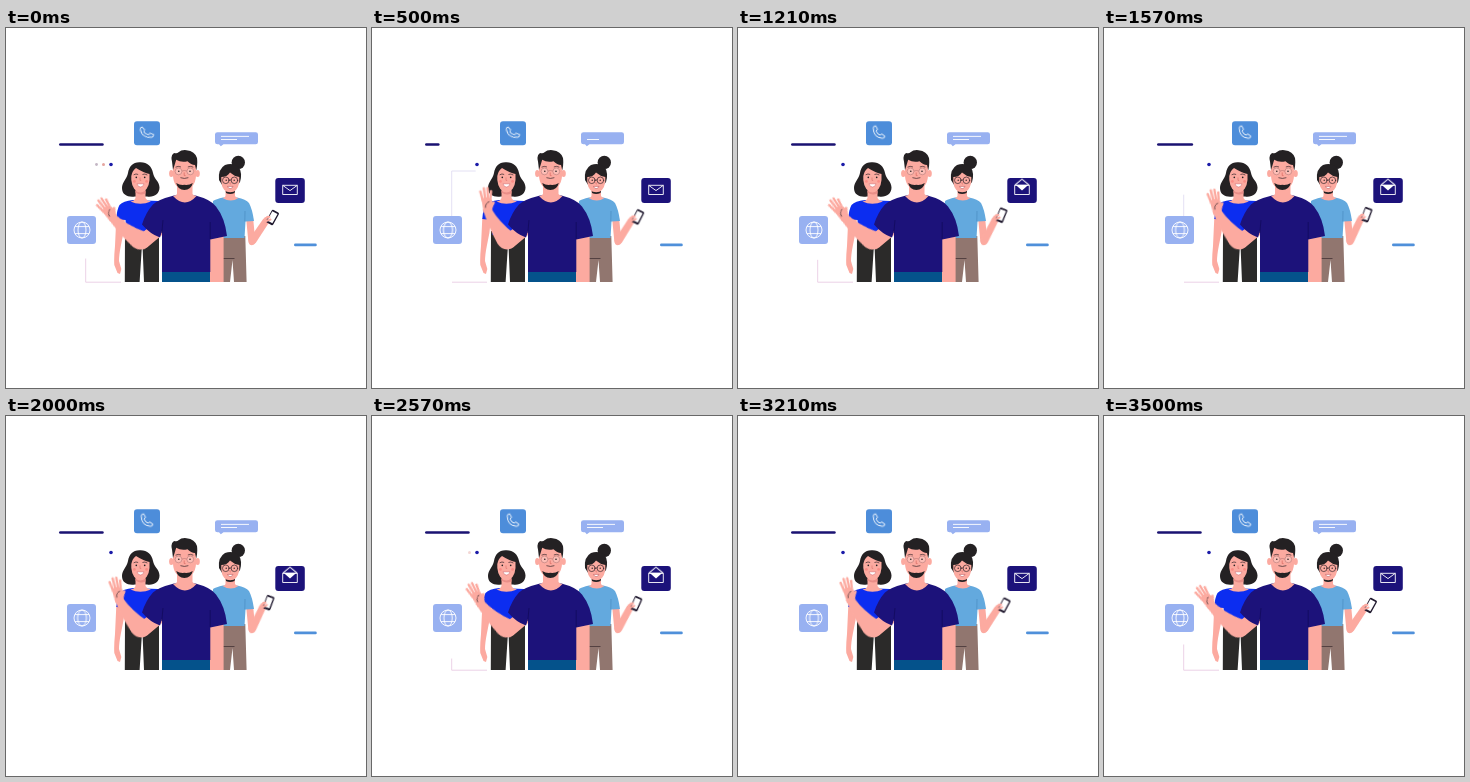
An HTML page that plays this animation: 360x360 px, repeating every 3.57 s.

```html
<!DOCTYPE html>
<html lang="en">
<head>
<meta charset="utf-8">
<title>Support team</title>
<style>
html, body { margin: 0; width: 100%; height: 100%; overflow: hidden; background: #fff; }
svg { display: block; width: 100vw; height: 100vh; }
.skin { fill: #fcaaa0; }
.limb { fill: none; stroke: #fcaaa0; stroke-linecap: round; stroke-linejoin: round; }
.ink { fill: #242123; }
.thin { fill: none; stroke: #33242a; stroke-width: .7; stroke-linecap: round; }
.icon { fill: none; stroke: #fff; stroke-width: .9; stroke-linejoin: round; }
.loop { animation: 3570ms linear infinite; }
.beat { animation: 1190ms linear infinite; }
.sway { animation: 595ms cubic-bezier(.37, 0, .63, 1) infinite alternate; }

.forearm { transform-origin: 135px 214px; animation-name: forearm; }
.hand { transform-origin: 116px 182px; animation-name: hand; }
@keyframes forearm { from { transform: rotate(-19deg); } to { transform: none; } }
@keyframes hand { from { transform: rotate(-13deg); } to { transform: none; } }

.hold { transform-origin: 246px 214px; animation: hold 1785ms cubic-bezier(.37, 0, .63, 1) infinite alternate; }
@keyframes hold { to { transform: rotate(-9deg); } }

.bar { stroke-dasharray: 42 60; animation-name: bar; }
@keyframes bar {
  0%, 28% { stroke-dashoffset: 0; }
  42% { stroke-dashoffset: 30; }
  46% { stroke-dashoffset: 36; }
  50% { stroke-dashoffset: 42.5; }
  66%, 100% { stroke-dashoffset: 0; }
}

.corner { stroke-dasharray: 61 80; animation-name: corner; }
@keyframes corner {
  0% { stroke-dashoffset: 2; }
  16% { stroke-dashoffset: 14; }
  30%, 54% { stroke-dashoffset: 26; }
  62%, 74% { stroke-dashoffset: 61; }
  94%, 100% { stroke-dashoffset: 0; }
}

.edge { stroke-dasharray: 69 140; animation-name: edge; }
@keyframes edge {
  0%, 28% { stroke-dashoffset: 69; }
  41%, 47% { stroke-dashoffset: 0; }
  56%, 100% { stroke-dashoffset: -69; }
}

.flap { transform-origin: 284px 157.3px; animation-name: flap; }
.letter { animation-name: letter; }
@keyframes flap {
  0%, 18% { transform: none; }
  25%, 74% { transform: scaleY(-1.15); }
  81%, 100% { transform: none; }
}
@keyframes letter {
  0%, 21% { opacity: 0; }
  25%, 74% { opacity: 1; }
  78%, 100% { opacity: 0; }
}

.ring { transform-origin: 141px 104.5px; animation-name: ring; }
@keyframes ring {
  0% { transform: rotate(-12deg); }
  5% { transform: rotate(5deg); }
  10% { transform: rotate(-12deg); }
  15% { transform: rotate(-12deg); }
  20%, 100% { transform: rotate(4deg); }
}

.globe { transform-origin: 76px 202px; animation-name: globe; }
@keyframes globe { from { transform: scaleX(1); } to { transform: scaleX(1.15); } }

.text1 { stroke-dasharray: 28 40; animation-name: text1; }
.text2 { stroke-dasharray: 16 30; animation-name: text2; }
@keyframes text1 {
  0%, 9% { stroke-dashoffset: 0; }
  13%, 16% { stroke-dashoffset: 28.5; }
  24%, 100% { stroke-dashoffset: 0; }
}
@keyframes text2 {
  0%, 9% { stroke-dashoffset: 0; }
  14%, 18% { stroke-dashoffset: 4; }
  24%, 100% { stroke-dashoffset: 0; }
}

.dot1 { animation-name: dot1; }
.dot2 { animation-name: dot2; }
@keyframes dot1 {
  0%, 3% { opacity: 1; }
  6%, 100% { opacity: 0; }
}
@keyframes dot2 {
  0%, 4% { opacity: 1; }
  8%, 69% { opacity: 0; }
  72%, 74% { opacity: .45; }
  77%, 99% { opacity: 0; }
  100% { opacity: 1; }
}
</style>
</head>
<body>
<svg viewBox="0 0 360 360">
  <!-- frame lines -->
  <g fill="none" stroke-width=".8">
    <path class="corner beat" d="M115 254.2H79.7V228" stroke="#e6c6e0"/>
    <path class="edge beat" d="M79.7 188V143H104" stroke="#dcd8f0"/>
  </g>

  <!-- bars and dots -->
  <path class="bar beat" d="M54.4 116.5H96.4" fill="none" stroke="#1a1272" stroke-width="2.7" stroke-linecap="round"/>
  <path d="M289.4 216.9H309.4" stroke="#4f90da" stroke-width="2.8" stroke-linecap="round"/>
  <circle class="dot1 loop" cx="90.5" cy="136.5" r="1.4" fill="#c3b6c4"/>
  <circle class="dot2 loop" cx="97.5" cy="136.5" r="1.5" fill="#e5a59f"/>
  <circle cx="105" cy="136.5" r="1.8" fill="#1b1ba8"/>

  <!-- phone tile -->
  <rect x="128" y="93.3" width="26" height="24" rx="3" fill="#4d8dda"/>
  <path class="icon ring loop" d="M135 100.3q0-2 2.3-2.2l2 3.2-1.2 1.9q1 2.8 4 3.8l1.8-1.2 3.2 2q-.2 2.2-2.3 2.3-9.4-.5-9.8-9.8z"/>

  <!-- globe tile -->
  <rect x="61" y="188" width="29" height="28" rx="3" fill="#98b1f1"/>
  <g class="icon">
    <circle cx="76" cy="202" r="8"/>
    <ellipse class="globe sway" cx="76" cy="202" rx="4" ry="8"/>
    <path d="M69 198.6H83M69 205.6H83"/>
  </g>

  <!-- speech bubble -->
  <path d="M211.5 104.3H249.7Q252 104.3 252 106.6V114Q252 116.3 249.7 116.3H217.5L214.8 118.2 213 116.3H211.5Q209 116.3 209 114V106.6Q209 104.3 211.5 104.3z" fill="#98b1f1"/>
  <g class="icon">
    <path class="text1 loop" d="M215 108.4H243"/>
    <path class="text2 loop" d="M215 111.5H231"/>
  </g>

  <!-- mail tile -->
  <rect x="269.3" y="150" width="29.5" height="24.9" rx="3" fill="#1c127a"/>
  <path class="letter loop" d="M277.5 156.8H290.5L284 162.5z" fill="#fff"/>
  <g class="icon">
    <path d="M276.7 157.3V166.5H291.3V157.3z"/>
    <path class="flap loop" d="M276.7 157.3L284 162.6 291.3 157.3"/>
  </g>

  <!-- woman on the left -->
  <path class="ink" d="M134 134.3C127 134 123 138.5 122 145 121 151 116 154 116 160 116 167 122 169.5 129 168.5H141C148 169.5 153.5 166 153.5 159.5 153.5 153.5 148 151 147 145 146 138.5 141 134 134 134.3z"/>
  <path class="skin" d="M110.3 190H119Q118 205 114.8 218 113 227 113 233L115.3 241 114 246 111.5 245 108.3 237Q107.8 230 109 218z"/>
  <path d="M119 203H153V254H138L136.3 212 133.6 254H118.8z" fill="#2b2a29"/>
  <path d="M127 172Q117 173 113.5 177 111 181 110.3 191L119.5 192 120.5 207H152V173z" fill="#0c2df0"/>
  <path class="skin" d="M129.5 160H139.5V170Q141 173 145 173.5 134 178 124.5 173.5 128.5 173 129.5 170z"/>
  <path d="M129.5 162.5Q134 166.5 139.5 162.5V165.5Q134 168 129.5 164.5z" fill="#e98e88"/>
  <path class="skin" d="M125.3 148Q126.3 142.5 130 140 138 145 143.5 146V152Q142.5 163.6 134.3 163.6 126.5 163.6 125.3 152z"/>
  <path class="thin" d="M128 146.6Q130 145.3 131.8 146.3M136.8 146.3Q139 145.3 141 146.8"/>
  <path d="M134 149.5V152.4H135.2" fill="none" stroke="#d9706a" stroke-width=".6"/>
  <g class="ink"><circle cx="130.3" cy="149.4" r=".8"/><circle cx="138.7" cy="149.4" r=".8"/></g>
  <g fill="#fa8d86"><circle cx="128.4" cy="153.4" r="1.4"/><circle cx="140.6" cy="153.4" r="1.4"/></g>
  <path d="M131 155.8H138Q137.3 159 134.5 159 131.7 159 131 155.8z" fill="#fff" stroke="#cf5a60" stroke-width=".5"/>

  <!-- woman on the right -->
  <circle class="ink" cx="232.3" cy="134.4" r="6.7"/>
  <path class="ink" d="M213 152Q211.8 141 219 137 227 134 233 139.5 236.6 145 234 154L229 160H218z"/>
  <path d="M217 208H239.3L240.6 254H228L226.5 232 224 254H217z" fill="#91766f"/>
  <path d="M217 230.5H228.5" fill="none" stroke="#4d3b3d" stroke-width=".9"/>
  <path class="limb" d="M243.7 191L245.8 213" stroke-width="7"/>
  <g class="hold">
    <path class="skin" d="M242.5 212L257.5 190.5 263 194.5 250 214.5Q247 218.5 243.6 216.5z"/>
    <path class="limb" d="M259.5 194L262 190.5" stroke-width="5"/>
    <g transform="rotate(29 266.5 189.5)">
      <rect x="262.5" y="182.4" width="8" height="14.2" rx="1.4" fill="#1d162c"/>
      <rect x="263.3" y="184" width="5.9" height="10.6" fill="#fff"/>
    </g>
    <path class="limb" d="M259 190.5L263.5 188.8M260 193L264.5 191.5" stroke-width="2"/>
  </g>
  <path d="M217 169.5Q210 171 207 173V210H238.5L239.5 193.5 248 193Q246.3 181 243 175 240 171 231 169.5z" fill="#63a9de"/>
  <path d="M238.8 193.5L239 183" fill="none" stroke="#4687bd" stroke-width=".6"/>
  <path class="skin" d="M219.5 161H229V168Q230 170 232.5 170 225 175 216.5 170 219 170 219.5 168z"/>
  <path class="ink" d="M219.7 163H229L228.5 165Q224 166.8 220 165z"/>
  <path class="skin" d="M215.3 149Q221 149 224 144.5 228.5 148.5 233.3 149V154Q231.5 164.3 224.3 164.3 216.5 164.3 215.3 154z"/>
  <g class="thin">
    <circle cx="219.8" cy="152.3" r="3.3"/><circle cx="228.4" cy="152.3" r="3.3"/>
    <path d="M223.1 152H225.1"/>
  </g>
  <path d="M224 153.8V156H225" fill="none" stroke="#d9706a" stroke-width=".6"/>
  <g class="ink"><circle cx="220.2" cy="152.3" r=".7"/><circle cx="228.2" cy="152.3" r=".7"/></g>
  <path d="M221.5 158.4H227Q226.3 160.6 224.2 160.6 222.2 160.6 221.5 158.4z" fill="#fff" stroke="#b3464d" stroke-width=".5"/>

  <!-- waving arm -->
  <path class="limb" d="M152 201L136.5 213.8" stroke-width="14.5"/>
  <g class="forearm sway">
    <path class="skin" d="M111.5 181L119.8 180Q127.5 194 142 205.5 144.5 214 137 221.3 130 222.5 125.5 215.5 117 199 111.5 181z"/>
    <g class="hand sway">
      <path class="skin" d="M110.6 171Q114 167.5 120 170.5L122 175Q121.5 181 119.8 184H112.2z"/>
      <path class="limb" d="M111.8 172.5L109.6 163M114.2 171.5L113.2 159.8M116.9 171.5L116.9 159.8M119.2 172.5L120.3 163" stroke-width="2.4"/>
      <path class="limb" d="M119.8 179L122.4 174.5" stroke-width="2.6"/>
      <path class="thin" d="M114.2 179Q114.2 174.5 118 173.5"/>
    </g>
  </g>

  <!-- man -->
  <path class="skin" d="M204 207H217.6V254H204z"/>
  <path d="M156 242H204V254H156z" fill="#04528b"/>
  <path d="M168 167.5Q152 171.5 147 176.5 140 184 136 196.5 144 206 154 209.5L156 203V244H204.3V211.5L221 208Q219 190 210 178.5 205 171.5 189.5 167.5z" fill="#1c127a"/>
  <path d="M155.8 205L157 192M204.2 211V194" fill="none" stroke="#110a58" stroke-width=".7"/>
  <path class="skin" d="M171 156H186.5V166Q188 168 190.5 168 179 181 167 168 170 168 171 166z"/>
  <g class="skin"><ellipse cx="165.3" cy="145.5" rx="2.2" ry="3.5"/><ellipse cx="191.6" cy="145.5" rx="2.2" ry="3.5"/></g>
  <path class="skin" d="M167 132H190V148Q189 161 178.3 161 168 161 167 148z"/>
  <path class="ink" d="M167 142L166 133.5Q164.3 127 168 125 171 126 172.5 124.3 175.5 121.6 180.5 122.2 189 123.2 191 130 191.8 136 190.3 142.5L189 137Q185 137 181.5 133.3 175 134.8 170.2 131.8L168.6 137z"/>
  <path class="ink" d="M170.2 155Q174 157.4 178.4 156.8 183 157.4 186.8 155 185 162 178.4 162 171.8 162 170.2 155z"/>
  <path class="thin" d="M169.9 139Q172.3 137.7 174.6 138.8M182.2 138.8Q184.5 137.7 187 139"/>
  <g fill="#fdbdb5" stroke="#a76d6c" stroke-width=".5">
    <circle cx="172.5" cy="143.4" r="3.4"/><circle cx="184.3" cy="143.4" r="3.4"/>
    <path d="M175.9 143Q178.4 142 180.9 143" fill="none"/>
  </g>
  <g class="ink"><circle cx="172.8" cy="143.3" r=".8"/><circle cx="184" cy="143.3" r=".8"/></g>
  <path d="M178.2 144.5V147.6H179.6" fill="none" stroke="#d9665f" stroke-width=".7"/>
  <path class="thin" d="M174.8 149.8Q178.4 151.2 182 149.8"/>
</svg>
</body>
</html>
```
